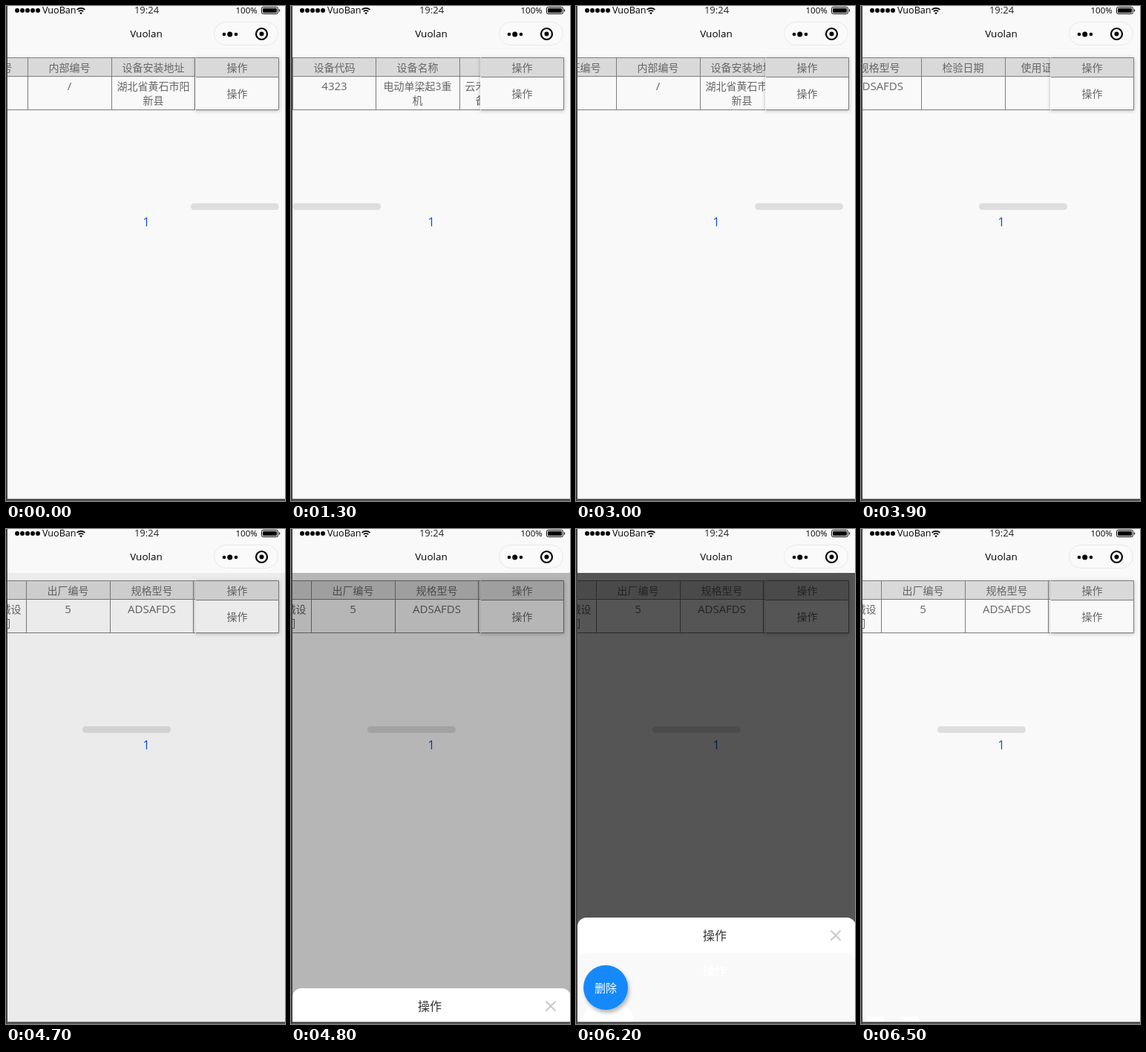
Recreate the animation shown at these times as an HTML page. Size 376 px wide and 665 px high, loop 8 s.

```html
<!DOCTYPE html>
<html lang="zh-CN">
<head>
<meta charset="utf-8">
<title>Table scroll and action sheet</title>
<style>
html, body { margin: 0; width: 100%; height: 100%; overflow: hidden; background: #f9f9f9; }
svg { display: block; width: 376px; height: 665px; }
text { font-family: 'Open Sans', 'Noto Sans CJK SC', 'Noto Sans CJK', sans-serif; font-size: 14px; fill: #666; }
.mid { text-anchor: middle; }
.line { stroke: #7c7c7c; fill: none; }
</style>
</head>
<body>
<svg viewBox="0 0 376 665">
  <defs>
    <clipPath id="tableClip"><rect x="2" y="60" width="366" height="90"/></clipPath>
    <clipPath id="pageClip"><rect x="2" y="59" width="374" height="603"/></clipPath>
    <clipPath id="trailClip"><path d="M2 655H31V662H2ZM55 655H82V662H55Z"/></clipPath>
    <filter id="soft" x="-20%" y="-20%" width="140%" height="150%">
      <feDropShadow dx="0" dy="1" stdDeviation="2.5" flood-opacity=".25"/>
    </filter>
    <filter id="lift" x="-30%" y="-30%" width="160%" height="160%">
      <feDropShadow dx="2" dy="4" stdDeviation="2.5" flood-opacity=".28"/>
    </filter>
  </defs>

  <rect width="376" height="665" fill="#f9f9f9"/>

  <g clip-path="url(#tableClip)">
    <g id="table"></g>
    <path class="line" d="M2 69.5H368M2 94.5H368M2 139.5H368"/>
  </g>

  <g filter="url(#soft)">
    <rect x="255" y="69" width="113" height="71" fill="#f9f9f9"/>
    <rect x="255" y="69" width="113" height="26" fill="#d9d9d9"/>
  </g>
  <path class="line" d="M256 69.5H367.5V139.5H256M256 95.5H368"/>
  <text class="mid" x="311.5" y="88">操作</text>
  <text class="mid" x="311.5" y="123">操作</text>

  <rect id="thumb" y="265" width="119" height="9" rx="4.5" fill="#dedede"/>
  <text class="mid" x="189" y="296" style="font-size:16px;fill:#0a50d8">1</text>
  <g id="trail" clip-path="url(#trailClip)"><circle cx="43" cy="667" r="36" fill="#fff"/></g>

  <rect id="shade" x="2" y="59" width="374" height="603"/>

  <g clip-path="url(#pageClip)">
    <g id="sheet">
      <path d="M2 662V534a12 12 0 0 1 12-12H365a12 12 0 0 1 12 12V662Z" fill="#fff"/>
      <g id="tint">
        <path d="M2 662V582a12 12 0 0 1 12-12H365a12 12 0 0 1 12 12V662Z" fill="#f9f9f9"/>
        <text class="mid" x="187" y="599" style="font-size:16px;font-weight:600;fill:#fff">操作</text>
        <circle cx="43" cy="667" r="36" fill="#fff"/>
      </g>
      <text class="mid" x="187" y="552" style="font-size:16px;fill:#333">操作</text>
      <path d="M343.5 539.5L356.5 552.5M356.5 539.5L343.5 552.5" stroke="#c8c9cc" stroke-width="2"/>
      <circle cx="40" cy="616" r="30" fill="#1989fa" filter="url(#lift)"/>
      <text class="mid" x="40" y="621.5" style="font-size:15px;fill:#fff">删除</text>
    </g>
  </g>

  <g id="dots"></g>
  <text x="49" y="10.3" style="font-size:12.6px;fill:#000">VuoBan</text>
  <g fill="none" stroke="#000" stroke-width="1.7">
    <path d="M95.5 5a8 8 0 0 1 11 0M97.8 7.4a4.7 4.7 0 0 1 6.4 0"/>
    <path d="M101 11.3l-1.9-2a2.8 2.8 0 0 1 3.8 0Z" fill="#000" stroke="none"/>
  </g>
  <text class="mid" x="189.5" y="10" style="font-size:13px;fill:#222">19:24</text>
  <text x="309.5" y="10" style="font-size:11.5px;fill:#000">100%</text>
  <rect x="344.5" y="1.5" width="22" height="9" rx="2" fill="none" stroke="#000"/>
  <rect x="346" y="3" width="19" height="6" rx="1"/>
  <path d="M368 4a2.2 2.2 0 0 1 0 4Z"/>
  <text class="mid" x="189" y="42" style="font-size:13.5px;fill:#000">Vuolan</text>
  <rect x="280.5" y="21.5" width="86" height="31" rx="15.5" fill="#fafafa" stroke="#e9e9e9"/>
  <circle cx="294" cy="38" r="2.3"/>
  <circle cx="301.7" cy="38" r="3.5"/>
  <circle cx="310" cy="38" r="2.3"/>
  <circle cx="344.5" cy="37.5" r="7.5" fill="none" stroke="#000" stroke-width="2.2"/>
  <circle cx="344.5" cy="37.5" r="3"/>

  <rect y="662" width="376" height="3" fill="#555"/>
  <rect width="2" height="665" fill="#444"/>
</svg>
<script>
const $ = id => document.getElementById(id);
const LOOP = 8000, TICK = 100;
const COL = 112.6, MAX = 760.5, SHEET = 143;

// header, then the lines of the cell below
const columns = [
  ['设备代码', '4323'],
  ['设备名称', '电动单梁起3重', '机'],
  ['使用单位', '云禾岚川机械设', '备有限公司'],
  ['出厂编号', '5'],
  ['规格型号', 'ADSAFDS'],
  ['检验日期', ''],
  ['使用证编号', ''],
  ['内部编号', '/'],
  ['设备安装地址', '湖北省黄石市阳', '新县'],
  ['', '']
];

// start time, number of ticks, scroll position reached
const drags = [
  [500, 4, 572],
  [1100, 3, 0],
  [1900, 3, MAX],
  [3000, 6, 502],
  [3900, 6, 312.2]
];

const label = (s, y) => {
  const size = /^[\w\/]+$/.test(s) ? 15 : 14;
  return `<text class="mid" x="56.5" y="${y}" style="font-size:${size}px">${s}</text>`;
};

$('table').innerHTML = columns.map(([head, ...lines]) =>
  `<g><rect y="69" width="114" height="26" fill="#d9d9d9"/>` +
  label(head, 88) + lines.map((s, i) => label(s, 113 + 19 * i)).join('') +
  `<path class="line" d="M.5 69V140"/></g>`).join('');

$('dots').innerHTML = [0, 1, 2, 3, 4].map(i =>
  `<circle cx="${15 + 7 * i}" cy="6" r="3"/>`).join('');

const cells = [...$('table').children];
const clamp = u => Math.max(0, Math.min(1, u));
const ease = u => .25 * u + .75 * u * u * (3 - 2 * u);

function scrollAt(t) {
  let pos = MAX;
  for (const [start, ticks, end] of drags) {
    if (t < start) break;
    pos += (end - pos) * ease(clamp(((t - start) / TICK + 1) / ticks));
  }
  return pos;
}

function shadeAt(t) {
  if (t < 4700 || t >= 6500) return 0;
  if (t < 6200) return .056 + .644 * clamp((t - 4700) / 300);
  return .66 * (1 - (t - 6200) / 300);
}

function draw(time) {
  const t = Math.floor(time % LOOP / TICK) * TICK;
  const pos = scrollAt(t);
  cells.forEach((cell, i) =>
    cell.setAttribute('transform', `translate(${Math.floor(2 + i * COL - pos)} 0)`));
  $('thumb').setAttribute('x', Math.round(2 + 247 * pos / MAX));

  $('shade').setAttribute('opacity', shadeAt(t));
  const open = t >= 4700 && t < 6500;
  const drop = SHEET * (1 - clamp((t - 4700) / 300));
  $('sheet').style.display = open ? '' : 'none';
  $('sheet').setAttribute('transform', `translate(0 ${Math.round(drop)})`);
  $('tint').style.display = drop ? 'none' : '';
  $('trail').style.display = t >= 6500 ? '' : 'none';
}

let begin;
function loop(now) {
  begin ??= now;
  draw(now - begin);
  requestAnimationFrame(loop);
}
draw(0);
requestAnimationFrame(loop);
</script>
</body>
</html>
```
